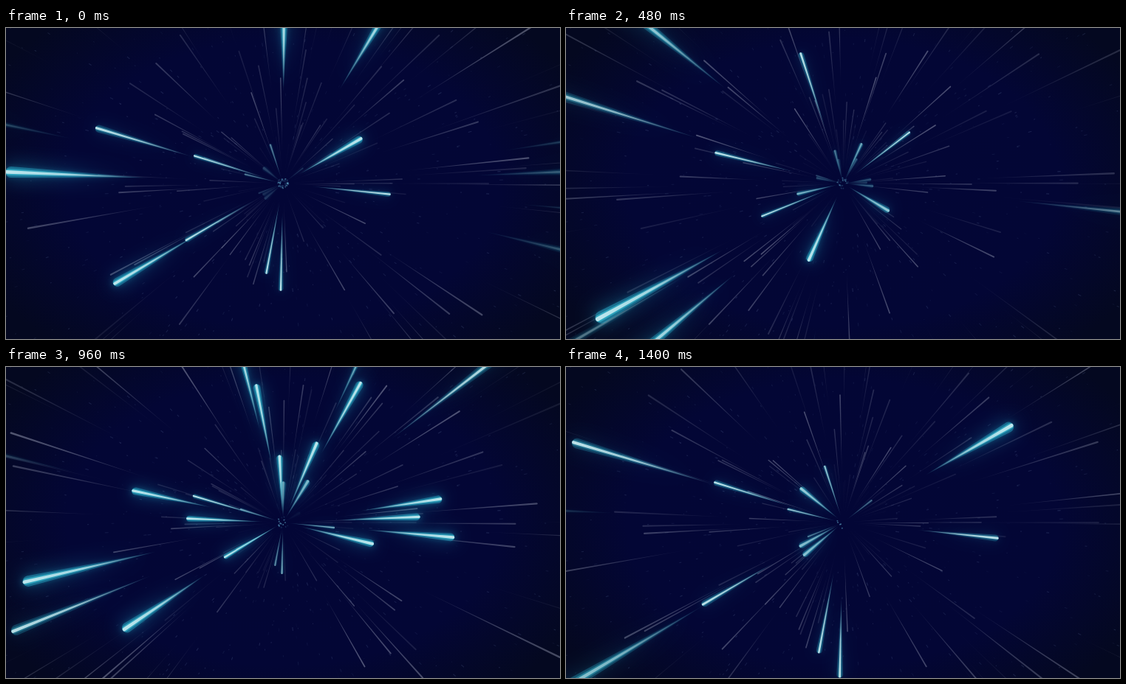
An HTML page with a canvas for the animation above (1.44 s loop, 750 by 422 pixels).

```html
<!DOCTYPE html>
<html lang="en">
<head>
<meta charset="utf-8">
<title>Warp speed</title>
<style>
html, body { margin: 0; width: 100%; height: 100%; overflow: hidden; background: #040820; }
canvas { display: block; }
</style>
</head>
<body>
<canvas id="stage" width="750" height="422"></canvas>
<script>
const W = 750, H = 422, CX = 375, CY = 211;
const LOOP = 1440, STEP = 40;
const FLIGHT = 1253; // the star field repeats after this many ms
const ctx = document.getElementById('stage').getContext('2d');

let seed = 11;
function random(min, max) {
  seed = (seed * 16807) % 2147483647;
  return min + (max - min) * seed / 2147483647;
}
const clamp = (v, lo, hi) => Math.min(hi, Math.max(lo, v));
const ramp = (v, from, to) => clamp((v - from) / (to - from), 0, 1);
const many = (count, make) => Array.from({ length: count }, make);

// Glowing stars by growth rate: [angle in degrees, time at radius 100]
const glowing = {
  0.0052: [[-141, 203], [-30, 1212], [140, 215], [151, 222], [31, 540], [114, 452],
    [146, 775], [13.4, 915], [-93, 977], [-59, 1037], [-89.7, 1072], [-67, 927]],
  0.0036: [[-8.5, 744], [-2.4, 788], [5, 725], [-168, 755], [167, 603], [-65, 620],
    [-61, 743], [-101, 780], [-104, 690], [-177.6, 885], [149.2, 980]],
  0.0025: [[-37.7, 425], [-166.4, 248], [-163.4, 863], [100.5, 1164], [91.2, 1102],
    [5.8, 1100], [-162.6, 1158], [158, 409], [149.6, 1082], [-108, 230]]
};

const stars = many(105, () => ({
  angle: random(0, 360), time: random(0, FLIGHT), rate: random(0.0012, 0.0021),
  alpha: random(0.12, 0.5)
}));
for (const [rate, group] of Object.entries(glowing)) {
  for (const [angle, time] of group) stars.push({ angle, time, rate: +rate, alpha: 1, glow: true });
}
const dust = many(650, () => ({
  angle: random(0, 360), r: random(60, 430), length: random(1, 5), alpha: random(0.05, 0.24)
}));

function drawBackground() {
  ctx.fillStyle = '#040820';
  ctx.fillRect(0, 0, W, H);
  const g = ctx.createRadialGradient(0, 0, 0, 0, 0, 300);
  g.addColorStop(0, '#030636');
  g.addColorStop(0.65, '#030635');
  g.addColorStop(1, '#040820');
  ctx.save();
  ctx.translate(CX, CY);
  ctx.scale(1.5, 1);
  ctx.fillStyle = g;
  ctx.fillRect(-300, -300, 600, 600);
  ctx.restore();
}

function atAngle(degrees, draw) {
  ctx.save();
  ctx.translate(CX, CY);
  ctx.rotate(degrees * Math.PI / 180);
  draw();
  ctx.restore();
}

function drawDust({ angle, r, length, alpha }) {
  atAngle(angle, () => {
    ctx.fillStyle = `rgba(105,125,170,${alpha})`;
    ctx.fillRect(r, 0, length, 1.1);
  });
}

function streak(tail, head, width, color, alpha) {
  const g = ctx.createLinearGradient(tail, 0, head, 0);
  g.addColorStop(0, `rgba(${color},0)`);
  g.addColorStop(0.55, `rgba(${color},${alpha * 0.8})`);
  g.addColorStop(1, `rgba(${color},${alpha})`);
  const half = width / 2;
  ctx.fillStyle = g;
  ctx.beginPath();
  ctx.moveTo(tail, 0);
  ctx.lineTo(head - half, -half);
  ctx.arc(head - half, 0, half, -Math.PI / 2, Math.PI / 2);
  ctx.fill();
}

function drawGlow(tail, r, rate, strength) {
  const halo = 3 + r * 0.028 + (rate - 0.0025) * 1300;
  ctx.shadowColor = `rgba(30,165,200,${strength})`;
  ctx.shadowBlur = 12 + halo;
  streak(tail, r, halo, '35,150,180', strength * 0.55);
  ctx.shadowBlur = 8;
  streak(tail, r, halo * 0.6, '60,195,215', strength * 0.6);
  ctx.shadowBlur = 0;
}

function drawStar({ angle, rate, alpha, glow }, r) {
  const tail = r * clamp(0.1 + (r - 100) / 300, 0.1, 0.48);
  atAngle(angle, () => {
    if (r < 8) {
      ctx.fillStyle = `rgba(110,190,220,${alpha * 0.5})`;
      ctx.fillRect(r - 1, -1, 1.8, 1.6);
      return;
    }
    const shown = glow ? ramp(r, 25, 90) : ramp(r, 50, 120);
    if (!shown || tail > 430) return;
    if (!glow) {
      streak(tail, r, 1 + r / 260, '160,165,188', alpha * shown);
      return;
    }
    const faded = 1 - 0.6 * ramp(r, 390, 520);
    const strength = shown * faded * ramp(rate, 0.001, 0.0036);
    drawGlow(tail, r, rate, strength);
    const width = 1.1 + r * 0.008 + (rate - 0.0025) * 600;
    streak(tail, r, width, '205,238,243', shown * faded * 0.9);
  });
}

function render(time) {
  const now = Math.floor((time % LOOP) / STEP) * STEP;
  drawBackground();
  dust.forEach(drawDust);
  for (const star of stars) {
    for (let lap = -1; lap <= 2; lap++) {
      const r = 100 * Math.exp(star.rate * (now - star.time + lap * FLIGHT));
      if (r > 3 && r < 900) drawStar(star, r);
    }
  }
  requestAnimationFrame(render);
}
requestAnimationFrame(render);
</script>
</body>
</html>
```
